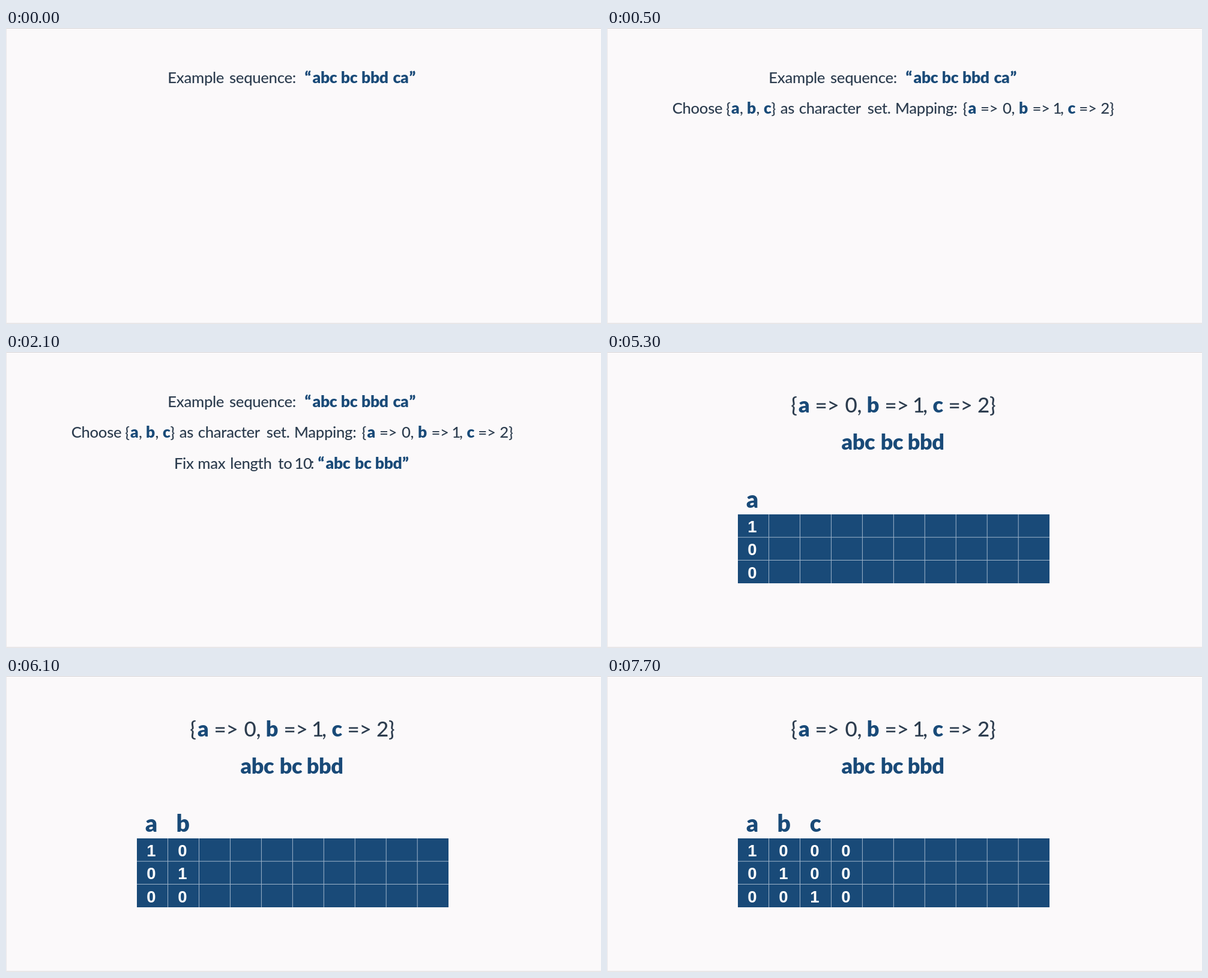
An HTML page for the animation above (8000 ms loop, 991x494 px).

```html
<!DOCTYPE html>
<html lang="en">
<head>
<meta charset="utf-8">
<title>One-hot encoding of a sequence</title>
<style>
  html, body { margin: 0; width: 100%; height: 100%; overflow: hidden; background: #fbf9fa; }
  svg { display: block; width: 991px; height: 494px; }
  text { font-family: Lato, "Open Sans", sans-serif; font-weight: 500; fill: #2d3d4f; }
  .line { letter-spacing: -.012em; }
  .bold { font-weight: 900; fill: #194a78; }
  tspan.bold { font-size: 1.03em; }
  .label { font-size: 43.5px; font-weight: 300; fill: #194a78; text-anchor: middle; }
  .head { font-size: 39px; text-anchor: middle; }
  .digit { font: bold 27.5px "Liberation Sans", Arial, sans-serif; fill: #fff; text-anchor: middle; }
</style>
</head>
<body>
<svg id="stage" viewBox="0 0 991 494">
  <path d="M0 .5H991M0 493H991" stroke="#d6d4d6"/>
  <path d="M.5 0V494" stroke="#e9e7e9"/>
</svg>
<script>
const LOOP = 8000, INTRO_END = 5300;
const stage = document.getElementById('stage');
const scenes = [];

function add(parent, tag, attrs, content = '') {
  const node = document.createElementNS('http://www.w3.org/2000/svg', tag);
  for (const key in attrs) node.setAttribute(key, attrs[key]);
  node.textContent = content;
  return parent.appendChild(node);
}

// A group that is visible from `start` until `end`
function scene(start, end = LOOP) {
  const group = add(stage, 'g', {});
  scenes.push({ group, start, end });
  return group;
}

// Words as "x:word", separated by spaces; * marks bold
function line(parent, y, size, words) {
  const text = add(parent, 'text', { y, class: 'line', 'font-size': size });
  for (const item of words.split(' ')) {
    const [, x, star, word] = item.match(/^([\d.]+):(\*?)(.*)$/);
    add(text, 'tspan', { x, class: star && 'bold' }, word);
  }
}

line(scene(0, INTRO_END), 92, 25.7,
  '269.3:Example 372:sequence: 497.5:*“ 510.5:*abc 557.8:*bc 592:*bbd 644.5:*ca 671.5:*”');
line(scene(500, INTRO_END), 143, 25.7,
  '108.7:Choose 198.3:{ 207:*a 221:, 233:*b 248.5:, 261:*c 273.5:} 288.7:as 319.7:character ' +
  '433.8:set. 480:Mapping: 592.5:{ 601.5:*a 622:=> 659:0, 686:*b 708.5:=> 742.5:1 755:, 767.5:*c 786.3:=> 822.3:2}');
line(scene(2100, INTRO_END), 195, 25.7,
  '279.9:Fix 319.3:max 373.3:length 453.3:to 480.5:10 507:: 519.5:*“ 532.5:*abc 581:*bc 614.8:*bbd 660:*”');

const grid = scene(3700);
add(grid, 'rect', { x: 218, y: 271, width: 519, height: 115, fill: '#194a78' });
let rules = 'M218 309.2H737M218 347.5H737';
for (let i = 1; i < 10; i++) rules += `M${217.6 + 51.95 * i} 271V386`;
add(grid, 'path', { d: rules, stroke: '#9fb4ca' });

const labels = scene(3700, INTRO_END);
add(labels, 'text', { x: 124.5, y: 323.5, class: 'label' }, 'Charset');
add(labels, 'text', { x: 124, y: 375, class: 'label' }, 'size');
add(labels, 'text', { x: 477, y: 439, class: 'label' }, 'Max Length');

const mapping = scene(INTRO_END);
line(mapping, 101, 35,
  '306.3:{ 319:*a 346.5:=> 396.5:0, 432.7:*b 462.5:=> 509:1 526:, 542.5:*c 568.5:=> 617:2}');
line(mapping, 163, 35, '390.5:*abc 455.7:*bc 500.7:*bbd');

// One column of the matrix per character; a space has no heading and maps to zeros
[...'abc '].forEach((char, col) => {
  const column = scene(INTRO_END + 800 * col), x = 242 + 52 * col;
  add(column, 'text', { x: x + col * .6, y: 260, class: 'bold head' }, char);
  [301, 339.3, 378].forEach((y, row) =>
    add(column, 'text', { x, y, class: 'digit' }, char === 'abc'[row] ? 1 : 0));
});

function draw() {
  const t = performance.now() % LOOP;
  for (const { group, start, end } of scenes)
    group.setAttribute('visibility', t >= start && t < end ? 'visible' : 'hidden');
  requestAnimationFrame(draw);
}
draw();
</script>
</body>
</html>
```
